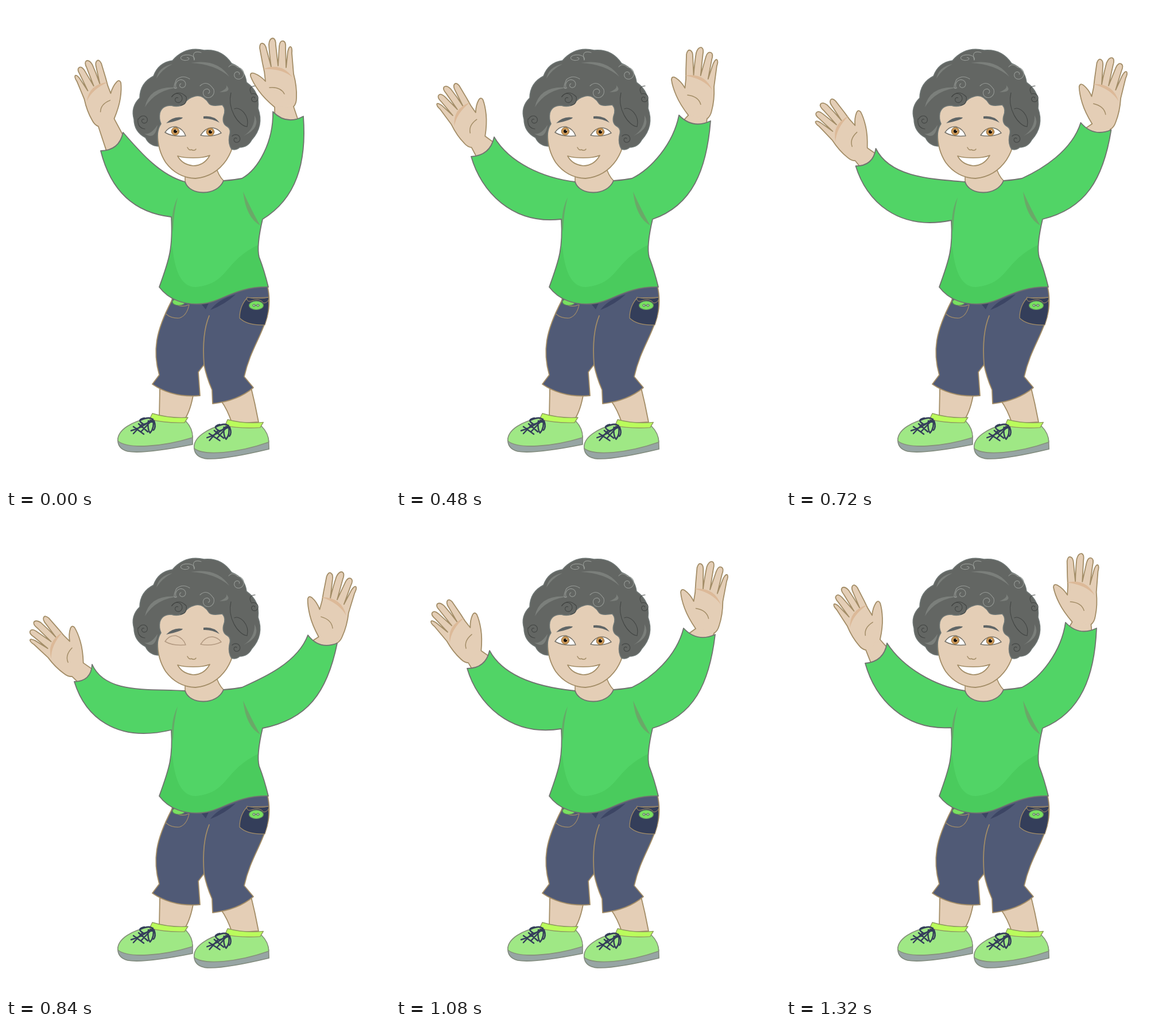
An HTML page with a canvas that plays this animation: 669 px wide and 837 px high, repeating every 1.44 s.

```html
<!DOCTYPE html>
<html lang="en">
<head>
<meta charset="utf-8">
<title>Waving child</title>
<style>
html, body { margin: 0; width: 100%; height: 100%; overflow: hidden; background: #fff; }
canvas { display: block; width: 100%; height: 100%; }
</style>
</head>
<body>
<canvas id="stage" width="669" height="837"></canvas>
<script>
const ctx = document.getElementById('stage').getContext('2d');
ctx.lineJoin = 'round';
ctx.lineCap = 'round';

const SKIN = '#e4ceb6', EDGE = '#a38d67', GREY = '#70736f';
const GREEN = '#51d466', HAIR = '#636663', NAVY = '#343e5a', DENIM = '#505a76';

const STEP = 120;
const ORDER = [0, 1, 2, 3, 4, 5, 6, 7, 6, 5, 4, 3];

// Each row: pose, middle fingertip, inner cuff corner, outer cuff corner
const RIGHT = [
  [0, 464, 57, 465, 184, 518, 192],
  [2, 494, 62, 483, 184, 536, 192],
  [3, 514, 68, 487, 187, 541, 197],
  [4, 531, 73, 493, 190, 548, 200],
  [5, 550, 82, 501, 197, 556, 208],
  [7, 585, 100, 526, 209, 577, 223]
];
const LEFT = [
  [0, 141, 96, 204, 220, 165, 252],
  [2, 111, 115, 181, 220, 144, 255],
  [3, 99, 127, 176, 223, 138, 258],
  [4, 85, 141, 171, 228, 131, 262],
  [5, 73, 155, 163, 236, 124, 267],
  [7, 50, 186, 150, 260, 119, 290]
];

const HAND = 'M468 176Q450 161 440 147Q430 133 426 122Q425 115 432 117Q443 121 452 131' +
  'Q451 115 447 100L442 73Q442 64 447 65Q452 66 454 76L462 106Q459 85 458 67' +
  'Q459 56 465 56Q470 57 470 68L474 104L476 70Q477 60 483 61Q488 62 487 73' +
  'L488 107L491 79Q493 70 496 71Q499 73 498 82L501 118Q507 140 506 160Q506 170 501 175';
const CREASE = 'M447 110Q480 97 499 124Q480 108 447 110Z';
const PALM = 'M459 142Q478 140 485 153';

function draw(path, fill, stroke, width = 1.8) {
  const p = typeof path === 'string' ? new Path2D(path) : path;
  if (fill) { ctx.fillStyle = fill; ctx.fill(p); }
  if (stroke) { ctx.strokeStyle = stroke; ctx.lineWidth = width; ctx.stroke(p); }
}

function oval(x, y, rx, ry, fill, stroke, width) {
  const p = new Path2D();
  p.ellipse(x, y, rx, ry, 0, 0, 7);
  draw(p, fill, stroke, width);
}

function spiral(x, y, r, start, dir, color, squash = 1) {
  const p = new Path2D();
  for (let i = 0; i <= 34; i++) {
    const a = start + dir * i * 0.23, k = r * (1 - i / 42);
    p.lineTo(x + Math.cos(a) * k, y + Math.sin(a) * k * squash);
  }
  draw(p, null, color, 1.1);
}

function moved(d, m) {
  const p = new Path2D();
  p.addPath(new Path2D(d), m);
  return p;
}

function armAt(rows, pose, flip) {
  let i = 0;
  while (rows[i + 1][0] < pose) i++;
  const a = rows[i], b = rows[i + 1], t = (pose - a[0]) / (b[0] - a[0]);
  const [, tx, ty, ix, iy, ox, oy] = a.map((v, n) => v + (b[n] - v) * t);
  const dx = ox - ix, dy = oy - iy, len = Math.hypot(dx, dy);
  const nx = -dy * flip / len, ny = dx * flip / len;
  const turn = flip > 0 ? 3.1 * pose : -27.3 - 3.5 * pose;
  const size = flip > 0 ? 1 : 0.93;
  const m = new DOMMatrix().translate(tx, ty).rotate(turn).scale(flip * size, size).translate(-464, -57);
  const cuff = k => `${ix + dx * k + nx * 13} ${iy + dy * k + ny * 13}`;
  return {
    m, ix, iy, ox, oy, turn,
    inner: cuff(0.1), outer: cuff(0.9),
    sag: `${(ix + ox) / 2 + nx * 20} ${(iy + oy) / 2 + ny * 20}`
  };
}

function hand(arm) {
  const at = (x, y) => {
    const q = arm.m.transformPoint(new DOMPoint(x, y));
    return `${q.x} ${q.y}`;
  };
  const a = at(468, 176), b = at(501, 175);
  draw(`M${arm.inner}L${a}L${b}L${arm.outer}Z`, SKIN);
  draw(`M${arm.inner}L${a}M${b}L${arm.outer}`, null, EDGE);
  draw(moved(HAND, arm.m), SKIN);
  draw(`M${at(470, 176)}L${at(499, 175)}`, null, SKIN, 3);
  draw(moved(HAND, arm.m), null, EDGE);
  draw(moved(CREASE, arm.m), '#dcb998');
  draw(moved(PALM, arm.m), null, EDGE, 1.5);
}

function shirt(l, r, pose) {
  const a = r.turn * Math.PI / 180;
  const down = (x, y, dx, dy) =>
    `${x + dx * Math.cos(a) - dy * Math.sin(a)} ${y + dx * Math.sin(a) + dy * Math.cos(a)}`;
  const p = new Path2D(
    `M312 306C${270 - 3.6 * pose} ${295 + pose} ${l.ix + 32 - 1.3 * pose} ${l.iy + 37 + 2 * pose} ${l.ix} ${l.iy}` +
    `Q${l.sag} ${l.ox} ${l.oy}` +
    `C${l.ox + 15 + 0.5 * pose} ${l.oy + 60} ${216 - 3.6 * pose} ${359 + 5.5 * pose} 288 ${367 + pose}` +
    'C291 420 285 440 267 489C284 512 312 521 343 518C375 515 400 488 457 489' +
    'Q450 460 441 437Q436 418 447 371' +
    `C${506 + 2.6 * pose} ${335 + 3 * pose} ${down(r.ox, r.oy, 6 + 1.4 * pose, 80 + pose)} ${r.ox} ${r.oy}` +
    `Q${r.sag} ${r.ix} ${r.iy}` +
    `C${down(r.ix, r.iy, 1, 52)} ${440 + pose} 284 411 300` +
    'Q396 303 379 304C368 331 320 331 312 306Z');
  draw(p, GREEN);
  ctx.save();
  ctx.clip(p);
  draw('M290 418Q296 489 330 489C389 484 378 444 441 415L470 415L470 530L250 530Z', '#4acb5d');
  ctx.restore();
  draw('M299 333Q285 362 291 393Q292 360 299 333Z', '#66a868');
  draw('M413 323Q418 368 443 382Q430 360 413 323Z', '#6aa868');
  draw(p, null, GREY);
}

function shoe() {
  draw('M195 752Q193 770 212 775Q240 780 325 763L325 748Z', '#97a5a4', '#808a7c', 1.6);
  draw('M251 717C220 722 193 738 195 757C212 771 270 768 325 751Q326 736 313 722Q280 724 251 717Z',
    '#9fe885', '#85917a', 1.6);
  draw('M255 709Q285 718 317 716L311 725Q275 726 250 719Z', '#bafd5c', '#8f9a60', 1.4);
  draw('M218 739Q237 734 252 721M222 732L240 745M231 727L247 741M222 744L238 727' +
    'M256 719L235 741M234 721Q250 713 256 720Q259 734 251 743Q246 737 248 722' +
    'M241 717Q226 720 240 728L258 722Q262 733 257 738', null, NAVY, 2.5);
}

function legs() {
  draw('M268 665L267 716L311 720Q322 703 327 672Z', SKIN, EDGE);
  draw('M374 686Q386 702 394 727L440 724Q434 692 426 660Z', SKIN, EDGE);
  shoe();
  ctx.save();
  ctx.translate(328, 770);
  ctx.rotate(-0.038);
  ctx.translate(-195, -757);
  shoe();
  ctx.restore();

  draw('M455 485Q462 515 455 540C445 575 425 600 415 645L431 664Q404 687 360 692' +
    'L359 668Q349 645 345 624L335 637L338 678Q290 682 255 658L267 642' +
    'C255 600 261 566 288 514L300 480Z', DENIM, EDGE);
  draw('M354 539Q341 570 345 624', null, EDGE);
  draw('M356 529Q370 510 400 502Q382 519 356 529ZM339 517L348 528L354 515Z', '#3c4564');
  draw('M279 536Q288 544 302 543Q315 539 319 520M290 514Q303 527 318 520', null, EDGE, 1.2);
  oval(301, 515, 11, 6, '#78e060', '#5c8c5c', 1.2);
  draw('M420 508Q407 522 407 543Q420 556 451 555Q460 530 457 507Z', NAVY, EDGE, 1.2);
  draw('M420 507Q418 514 425 514Q442 507 449 517Q458 516 458 507Q440 511 420 507Z', NAVY, EDGE, 1);
  oval(436, 521, 12.5, 7.5, '#78e060', '#5c8c5c', 1.2);
  oval(432, 521, 2, 2, '#b8c8b0', '#596a60', 1);
  oval(439, 521, 2, 2, '#b8c8b0', '#596a60', 1);
  draw('M434 521L437 521', null, '#596a60', 1);
}

function hairPath() {
  const pts = [[265, 244], [243, 229], [223, 197], [233, 160], [257, 122], [290, 95], [345, 77],
    [393, 100], [419, 133], [439, 178], [428, 233], [407, 246], [393, 249]];
  let d = 'M265 244';
  for (let i = 1; i < pts.length; i++) {
    const [x0, y0] = pts[i - 1], [x, y] = pts[i];
    const dx = x - x0, dy = y - y0;
    d += `Q${(x0 + x) / 2 + dy * 0.3} ${(y0 + y) / 2 - dx * 0.3} ${x} ${y}`;
  }
  return d + 'Q387 240 389 227Q393 214 386 210Q376 205 379 192Q384 180 377 172' +
    'Q358 175 354 170Q343 153 329 157Q316 160 311 170Q300 177 288 173Q272 173 268 186Q266 196 270 205Q261 218 265 244Z';
}
const HAIR_SHAPE = hairPath();

function eye(lid, x, y, closed) {
  draw(lid, closed ? SKIN : '#fff', closed ? '#b39a82' : '#77736a', 1.5);
  if (closed) return;
  oval(x, y, 6.8, 6.8, '#c99656', '#94713f', 1);
  oval(x, y, 3, 3, '#15120f');
  oval(x + 1.8, y - 1.8, 0.9, 0.9, '#fff');
}

function brows(drop) {
  ctx.save();
  ctx.translate(0, drop);
  draw('M279 204Q291 191 308 194Q307 198 279 204Z', '#5f6566');
  draw('M344 192Q363 190 372 203Q358 195 344 196Z', '#5f6566');
  ctx.restore();
}

function head(closed) {
  draw('M312 292L312 306C318 333 368 333 379 304Q370 295 366 280Z', SKIN, EDGE, 1.6);
  draw('M262 170L264 222Q264 250 278 272Q298 299 330 300Q364 297 384 268Q393 254 396 240L398 160L300 150Z',
    SKIN, EDGE);
  draw(HAIR_SHAPE, HAIR, '#6f7775', 1.6);

  const shine = '#7b7f7b', light = '#959995', dark = '#434644';
  draw('M322 99Q368 91 389 123Q364 101 322 99Z', shine);
  draw('M242 176Q250 137 301 142Q262 145 242 176Z', shine);
  draw('M262 126Q266 106 290 101Q272 110 262 126Z', shine);
  draw('M414 226Q434 213 433 190Q445 212 414 226Z', shine);
  draw('M241 222Q252 225 264 207Q260 235 241 222Z', shine);
  draw('M372 150Q388 143 383 137Q396 150 372 150Z', shine);
  spiral(314, 91, 15, 0.4, -1, light, 0.5);
  draw('M328 94Q322 76 340 81', null, light, 1.1);
  spiral(404, 119, 12, -1.5, 1, light);
  draw('M404 107Q394 98 388 106', null, light, 1.1);
  spiral(306, 137, 11, 2.6, 1, light);
  draw('M297 143Q289 146 297 128Q308 119 320 127', null, light, 1.1);
  spiral(351, 150, 12, -0.5, 1, light);
  draw('M361 144Q350 128 338 139', null, light, 1.1);
  spiral(299, 162, 11, 3.5, 1, dark);
  draw('M289 158Q300 144 314 158Q316 171 304 173', null, dark, 1.1);
  spiral(432, 161, 9, 4.2, 1, dark);
  spiral(240, 199, 9, 3.4, 1, dark);
  spiral(401, 232, 9, 3.8, 1, dark);
  draw('M427 152Q421 140 434 139M230 196Q228 212 242 214', null, dark, 1.1);
  draw('M392 151C385 178 404 208 420 210C425 190 407 174 398 179', null, dark, 1.1);

  eye('M277 220Q284 209 296 210Q309 214 313 226Q290 228 277 220Z', 295, 218, closed);
  eye('M339 225Q348 211 360 212Q369 213 375 221Q358 229 339 225Z', 356, 219, closed);
  brows(closed ? 4 : 0);
  draw('M316 246Q319 252 323 250Q328 253 331 249', null, EDGE, 1.5);
  draw('M299 261C312 265 340 266 355 260Q345 278 326 278Q307 276 299 261Z', '#fff', EDGE, 1.7);
}

function render(pose) {
  ctx.fillStyle = '#fff';
  ctx.fillRect(0, 0, 669, 837);
  const l = armAt(LEFT, pose, -1), r = armAt(RIGHT, pose, 1);
  legs();
  head(pose === 7);
  hand(l);
  hand(r);
  shirt(l, r, pose);
}

const begin = performance.now();
function tick(now) {
  const n = Math.floor(Math.max(0, now - begin) / STEP) % ORDER.length;
  render(ORDER[n]);
  requestAnimationFrame(tick);
}
render(0);
requestAnimationFrame(tick);
</script>
</body>
</html>
```
